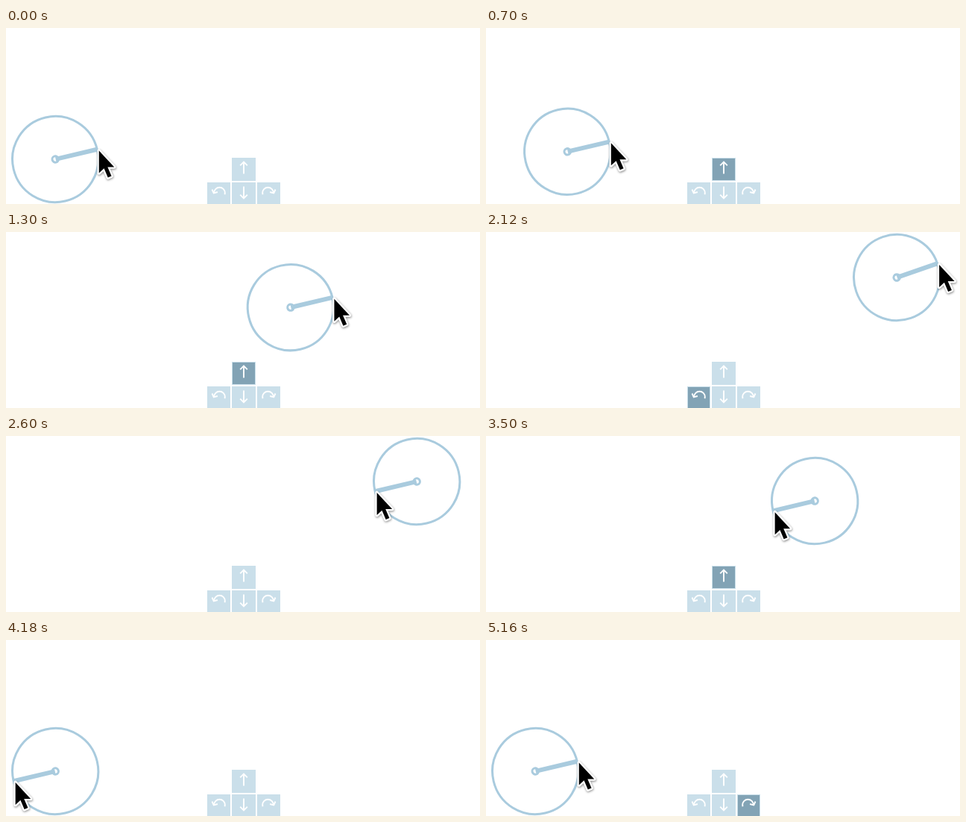
These frames come from a looping animation (636x236 px, 5.2 s). An HTML page with a canvas:

```html
<!DOCTYPE html>
<html lang="en">
<head>
<meta charset="utf-8">
<title>Dial moved and turned by arrow keys</title>
<style>
  html, body { margin: 0; width: 100%; height: 100%; overflow: hidden; background: #fff; }
  canvas { display: block; }
</style>
</head>
<body>
<canvas id="stage" width="636" height="236"></canvas>
<script>
const ctx = document.getElementById('stage').getContext('2d');
const LOOP = 5200, STEP = 40;
const BLUE = '#a9cbde', KEY = '#cadfea', KEY_DOWN = '#82a3b5';
const HOME = { x: 66.2, y: 176 }, AWAY = { x: 551.2, y: 61 };
const RADIUS = 57.6;
const RIGHT = -Math.PI * 13.3 / 180, LEFT = RIGHT - Math.PI;

const KEYS = [
  { name: 'up', x: 303, y: 174, w: 32, h: 31 },
  { name: 'left', x: 270, y: 207, w: 31, h: 30 },
  { name: 'down', x: 303, y: 207, w: 32, h: 30 },
  { name: 'right', x: 337, y: 207, w: 31, h: 30 }
];

const mix = (a, b, p) => a + (b - a) * p;
const ease = u => (u + 2 * u * u) / 3;

// Progress of an action; a key is held while its steps run.
function action(time, start, steps) {
  const step = Math.floor((time - start) / STEP) + 1;
  return {
    held: step >= 1 && step <= steps,
    p: ease(Math.min(Math.max(step / steps, 0), 1))
  };
}

function stateAt(time) {
  const go = action(time, 540, 26);
  const turn = action(time, 2120, 12);
  const back = action(time, 3140, 26);
  const unturn = action(time, 4720, 12);
  const p = go.p - back.p;
  return {
    x: mix(HOME.x, AWAY.x, p),
    y: mix(HOME.y, AWAY.y, p),
    angle: mix(RIGHT, LEFT, turn.p - unturn.p),
    pressed: go.held || back.held ? 'up' : turn.held ? 'left' : unturn.held ? 'right' : ''
  };
}

function tracePoints(points) {
  ctx.beginPath();
  points.forEach(([x, y], i) => i ? ctx.lineTo(x, y) : ctx.moveTo(x, y));
}

function drawStraightArrow() {
  tracePoints([[0, 8], [0, -8]]);
  ctx.stroke();
  tracePoints([[-4.8, -3.2], [0, -8], [4.8, -3.2]]);
  ctx.stroke();
}

function drawCurvedArrow() {
  ctx.beginPath();
  ctx.arc(1, 2, 7.3, Math.PI, Math.PI * 2.1);
  ctx.stroke();
  tracePoints([[-9, -2.5], [-6.8, 2.4], [-1.6, 1]]);
  ctx.stroke();
}

function drawKey(key, pressed) {
  ctx.fillStyle = KEY;
  ctx.fillRect(key.x, key.y, key.w, key.h);
  if (pressed) {
    ctx.fillStyle = KEY_DOWN;
    ctx.fillRect(key.x + 1, key.y + 1, key.w - 2, key.h - 2);
  }
  ctx.save();
  ctx.translate(key.x + key.w / 2, key.y + 13.5);
  if (key.name === 'right') ctx.scale(-1, 1);
  if (key.name === 'down') ctx.scale(1, -1);
  ctx.strokeStyle = '#fff';
  ctx.lineWidth = 1.9;
  if (key.name === 'up' || key.name === 'down') drawStraightArrow();
  else {
    ctx.translate(0, -1.5);
    drawCurvedArrow();
  }
  ctx.restore();
}

function drawDial({ x, y, angle }) {
  ctx.save();
  ctx.translate(x, y);
  ctx.rotate(angle);
  ctx.strokeStyle = BLUE;
  ctx.lineWidth = 3;
  ctx.beginPath();
  ctx.arc(0, 0, RADIUS, 0, Math.PI * 2);
  ctx.stroke();
  ctx.beginPath();
  ctx.arc(0, 0, 4.2, 0, Math.PI * 2);
  ctx.stroke();
  ctx.lineWidth = 6;
  tracePoints([[0.5, 0], [RADIUS + 1, 0]]);
  ctx.stroke();
  ctx.restore();
}

function drawCursor({ x, y, angle }) {
  ctx.save();
  ctx.translate(x + RADIUS * Math.cos(angle) + 2.5, y + RADIUS * Math.sin(angle) + 1.8);
  tracePoints([[0, 0], [0, 30], [6.8, 23.8], [12, 36], [16.8, 34], [11.6, 22], [20.5, 22]]);
  ctx.closePath();
  ctx.lineJoin = 'round';
  ctx.lineWidth = 4.6;
  ctx.strokeStyle = '#fff';
  ctx.shadowColor = 'rgba(0, 0, 0, 0.45)';
  ctx.shadowBlur = 3;
  ctx.shadowOffsetX = 0.5;
  ctx.shadowOffsetY = 1.2;
  ctx.stroke();
  ctx.shadowColor = 'transparent';
  ctx.fillStyle = '#000';
  ctx.fill();
  ctx.restore();
}

function draw(now) {
  const state = stateAt(now % LOOP);
  ctx.fillStyle = '#fff';
  ctx.fillRect(0, 0, 636, 236);
  KEYS.forEach(key => drawKey(key, key.name === state.pressed));
  drawDial(state);
  drawCursor(state);
}

const begun = performance.now();
function tick() {
  draw(performance.now() - begun);
  requestAnimationFrame(tick);
}
tick();
</script>
</body>
</html>
```
